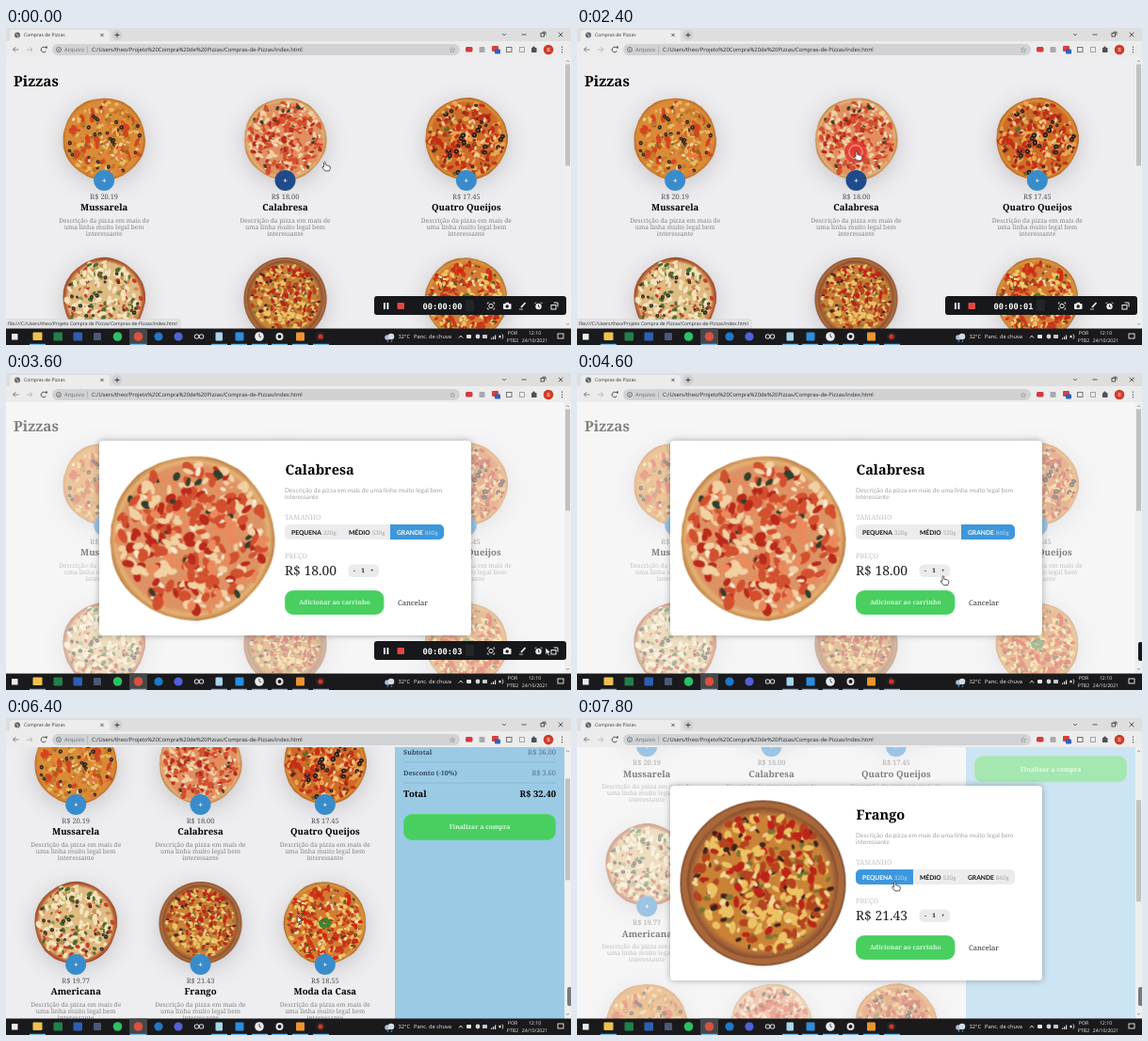
These frames come from a looping animation (600 px wide and 337 px high, 8000 ms). An HTML page with a canvas:

```html
<!DOCTYPE html>
<html lang="pt-BR">
<head>
<meta charset="utf-8">
<title>Compras de Pizzas</title>
<style>
html, body { margin: 0; width: 100%; height: 100%; overflow: hidden; background: #eeedef; }
canvas { display: block; width: 100vw; height: 100vh; }
</style>
</head>
<body>
<canvas id="stage"></canvas>
<script>
const W = 600, H = 337, LOOP = 8000, STEP = 200, TAU = Math.PI * 2;
const SLAB = '"Noto Serif", serif', UI = '"Open Sans", sans-serif', LATO = 'Lato, sans-serif';
const MONO = '"DejaVu Sans Mono", monospace';
const canvas = document.getElementById('stage');
let ctx = canvas.getContext('2d');

const ITEMS = [
  ['Mussarela', '20.19'], ['Calabresa', '18.00'], ['Quatro Queijos', '17.45'],
  ['Americana', '19.77'], ['Frango', '21.43'], ['Moda da Casa', '18.55']
];
const DESC = ['Descrição da pizza em mais de', 'uma linha muito legal bem', 'interessante'];

// Timelines: [ms, values...]
const CURSOR = [[0, 337.5, 142], [600, 329, 141], [1000, 330, 142], [1400, 337.5, 142], [2200, 296, 131],
  [3000, 296, 131], [3600, 573, 292], [3800, 580, 294], [4000, 580, 294], [4600, 388, 215.5], [5000, 387, 211],
  [5400, 376, 248], [5800, 376, 248], [6200, 350, 236], [6800, 228, 159], [7200, 228, 159], [7800, 336.5, 174]];
const POINTER = [[0, 'hand'], [2600, 'arrow'], [4400, 'hand'], [6000, 'arrow'], [6800, 'hand'], [7200, 'arrow'], [7600, 'hand']];
const RIPPLE = [[0, 0], [2400, 12], [2600, 8], [2800, 4], [3000, 0], [3800, 7], [4000, 0],
  [5000, 7], [5200, 0], [5600, 10], [5800, 7], [6000, 0]];
const MODAL = [[0, 0], [2600, .65], [2800, 1], [5600, .4], [5800, 0], [7200, 1]];
const ASIDE = [[0, 0], [5600, 85], [5800, 167], [6000, 180]];
const SCROLL = [[0, 0], [6200, 20], [6400, 70], [6600, 115], [6800, 131.7]];
const HOVER = [[0, 1], [2800, -1], [6800, 4], [7200, -1]];
const STATUS = [[0, 1], [3000, 0], [6800, 1], [7400, 0]];
const SECONDS = [[0, 0], [1600, 1], [2600, 2], [3600, 3]];

const at = (rows, t) => rows.filter(r => r[0] <= t).pop()[1];
function glide(rows, t) {
  const i = rows.findIndex(r => r[0] > t);
  if (i < 0) return rows[rows.length - 1].slice(1);
  const [a, b] = [rows[i - 1], rows[i]], k = (t - a[0]) / (b[0] - a[0]);
  return [1, 2].map(n => a[n] + (b[n] - a[n]) * k);
}

function box(x, y, w, h, color, r = 0) {
  ctx.fillStyle = color;
  ctx.beginPath();
  ctx.roundRect(x, y, w, h, r);
  ctx.fill();
}
function frame(x, y, w, h, color, width = .9) {
  ctx.strokeStyle = color;
  ctx.lineWidth = width;
  ctx.strokeRect(x, y, w, h);
}
function dot(x, y, r, color) {
  ctx.fillStyle = color;
  ctx.beginPath();
  ctx.arc(x, y, r, 0, TAU);
  ctx.fill();
}
function ring(x, y, r, color, w = 1, from = 0, to = TAU) {
  ctx.strokeStyle = color;
  ctx.lineWidth = w;
  ctx.beginPath();
  ctx.arc(x, y, r, from, to);
  ctx.stroke();
}
function line(color, w, ...p) {
  ctx.strokeStyle = color;
  ctx.lineWidth = w;
  ctx.beginPath();
  for (let i = 0; i < p.length; i += 2) ctx.lineTo(p[i], p[i + 1]);
  ctx.stroke();
}
// y is the middle of the capitals
function text(s, x, y, size, color, font = SLAB, weight = 400, align = 'left') {
  ctx.font = `${weight} ${size}px ${font}`;
  ctx.fillStyle = color;
  ctx.textAlign = align;
  ctx.fillText(s, x, y + size * .355);
}
function shadow(color, blur, dy, draw) {
  const k = canvas.width / W;
  ctx.save();
  ctx.shadowColor = color;
  ctx.shadowBlur = blur * k;
  ctx.shadowOffsetY = dy * k;
  draw();
  ctx.restore();
}

function seeded(s) {
  return () => {
    s = s + 0x6D2B79F5 | 0;
    let n = Math.imul(s ^ s >>> 15, 1 | s);
    n = n + Math.imul(n ^ n >>> 7, 61 | n) ^ n;
    return ((n ^ n >>> 14) >>> 0) / 4294967296;
  };
}

// toppings: [color, count, size, hollow?]
const RECIPES = [
  { rim: '#b5611f', crust: '#d88a35', cheese: '#d98c35', tops: [['#c4762a', 70, 6], ['#eab965', 70, 5],
    ['#d3451f', 28, 9], ['#e8773c', 28, 6], ['#77702c', 30, 3.5], ['#f3ddb0', 20, 4], ['#2a211d', 30, 4, 1]] },
  { rim: '#b8743a', crust: '#e3b274', cheese: '#dd9263', tops: [['#d2502f', 95, 7], ['#f1d0a2', 95, 6],
    ['#b92a1b', 50, 6], ['#ea8a5c', 60, 6], ['#30402a', 18, 5], ['#f7e9d0', 30, 4]] },
  { rim: '#a8551b', crust: '#dc8f35', cheese: '#cf6a28', tops: [['#e9a650', 70, 6], ['#c32e16', 75, 7],
    ['#efcc94', 50, 5], ['#8f2c17', 40, 5], ['#626a28', 22, 4], ['#201818', 28, 5, 1]] },
  { rim: '#8f4023', crust: '#c06a3a', cheese: '#dfbb82', tops: [['#f3e4bd', 100, 7], ['#d08d55', 60, 5],
    ['#c23f28', 42, 5], ['#4d6b30', 34, 6], ['#86a04c', 22, 4], ['#2b2525', 22, 4, 1]] },
  { rim: '#7d4525', crust: '#a9683a', cheese: '#c98236', board: 1, tops: [['#ebc263', 100, 6], ['#b3431f', 85, 6],
    ['#f0d898', 60, 4], ['#bd2417', 50, 6], ['#7c7430', 40, 4], ['#40231a', 45, 4]] },
  { rim: '#a5602a', crust: '#d9973f', cheese: '#d37b33', tops: [['#c83a1d', 85, 6], ['#efc766', 85, 6],
    ['#d5260f', 50, 6], ['#f3e0ae', 50, 4], ['#5a5527', 36, 4], ['#82301a', 36, 4]] }
];

function bake({ rim, crust, cheese, board, tops }, kind) {
  const rand = seeded(kind * 97 + 11), c = document.createElement('canvas'), main = ctx;
  c.width = c.height = 180;
  ctx = c.getContext('2d');
  ctx.translate(90, 90);
  if (board) {
    dot(0, 0, 88, rim);
    dot(0, 0, 86.5, crust);
    ctx.scale(.92, .92);
  }
  const fill = ctx.createRadialGradient(0, 0, 0, 0, 0, 89);
  fill.addColorStop(.86, cheese);
  fill.addColorStop(.92, crust);
  fill.addColorStop(1, rim);
  ctx.fillStyle = fill;
  ctx.beginPath();
  for (let a = 0; a < TAU; a += .1) {
    const r = 87 + .8 * Math.sin(5 * a + kind) + rand() * .8;
    ctx.lineTo(r * Math.cos(a), r * Math.sin(a));
  }
  ctx.fill();
  const pieces = tops.flatMap(([color, count, size, hollow]) =>
    Array.from({ length: count }, () => ({ color, size, hollow, order: rand() + (hollow ? .4 : 0) })));
  pieces.sort((a, b) => a.order - b.order);
  for (const { color, size, hollow } of pieces) {
    const a = rand() * TAU, r = 79 * Math.sqrt(rand()), long = size * (.7 + rand() * .5);
    const x = r * Math.cos(a), y = r * Math.sin(a), short = long * (hollow ? .9 : .4 + rand() * .4);
    ctx.fillStyle = color;
    ctx.beginPath();
    ctx.ellipse(x, y, long, short, rand() * TAU, 0, TAU);
    ctx.fill();
    if (hollow) dot(x, y, short * .35, '#a57a4c');
  }
  if (kind === 5) for (let i = 0; i < 7; i++) dot(9 * Math.cos(i * 2.4), 7 * Math.sin(i * 2.4), 5, '#3d8230');
  ctx = main;
  return c;
}
const pizzas = RECIPES.map(bake);
const pizza = (kind, x, y, r) => ctx.drawImage(pizzas[kind], x - r, y - r, r * 2, r * 2);

function greenButton(label, x, y, w, h) {
  box(x, y, w, h, '#58d66d', 9);
  box(x + 1, y + 1, w - 2, h - 2, '#48cf60', 8);
  text(label, x + w / 2, y + h / 2, 6.75, '#d5f6da', SLAB, 600, 'center');
}
function quantity(n, x, y, w) {
  box(x, y, w, 13.5, '#ebebed', 5);
  [['-', .2], [n, .48], ['+', .78]].forEach(([s, k]) =>
    text(s, x + w * k, y + 6.5, 6.3, '#111', SLAB, 700, 'center'));
}

function drawList(t, width, scroll) {
  text('Pizzas', 8, 57 - scroll, 15.3, '#000', SLAB, 700);
  for (let i = 0; i < 9; i++) {
    const [name, price] = ITEMS[i % 6], col = (width - 16) / 3;
    const x = 8 + col * (i % 3 + .5), y = 74 + 170 * Math.floor(i / 3) - scroll;
    if (y > 320) continue;
    shadow('#bfbec3', 26, 5, () => dot(x, y + 44, 42, '#d8a566'));
    pizza(i % 6, x, y + 44, 45);
    dot(x, y + 88, 11, at(HOVER, t) === i ? '#204b8b' : '#398ccb');
    text('+', x, y + 88, 8, '#fff', UI, 600, 'center');
    text('R$ ' + price, x, y + 105.5, 7.5, '#555', SLAB, 400, 'center');
    text(name, x, y + 117, 9.6, '#000', SLAB, 700, 'center');
    DESC.forEach((s, n) => text(s, x, y + 130.7 + n * 7, 6.62, '#858587', SLAB, 400, 'center'));
  }
}

function drawAside(left, scroll) {
  const x = left + 9, right = 584;
  ctx.save();
  ctx.beginPath();
  ctx.rect(left, 31, 593 - left, 289);
  ctx.clip();
  box(left, 31, 593 - left, 289, '#9bcae5');
  ctx.translate(0, -scroll);
  text('Suas Pizzas', x, 54.5, 11, '#000', SLAB, 700);
  pizza(1, x + 9, 77, 9);
  text('Calabresa (G)', x + 26, 77.5, 7.5, '#2b3740');
  quantity(2, right - 33, 70, 33);
  [95, 117, 139].forEach(y => line('#86b1ca', .8, x, y, right, y));
  [['Subtotal', '36.00', 106], ['Desconto (-10%)', '3.60', 128]].forEach(([s, v, y]) => {
    text(s, x, y, 7.1, '#34495a', SLAB, 600);
    text('R$ ' + v, right, y, 7.5, '#5b7485', SLAB, 400, 'right');
  });
  text('Total', x, 151, 9.5, '#000', SLAB, 700);
  text('R$ 32.40', right, 151, 9.5, '#000', SLAB, 700, 'right');
  greenButton('Finalizar a compra', x, 172, right - x, 28);
  ctx.restore();
}

function drawModal(t, alpha) {
  const kind = t < 7000 ? 1 : 4, [name, price] = ITEMS[kind];
  const photo = kind === 1 ? t >= 3000 : t >= 7400, chosen = t >= 7800 ? 0 : 2;
  ctx.globalAlpha = alpha;
  box(0, 31, 593, 289, 'rgba(255,255,255,.5)');
  shadow('rgba(0,0,0,.32)', 7, 0, () => box(99, 72, 395, 207, '#fff', 4));
  if (photo) pizza(kind, 197.5, 175.5, 90);
  text(name, 296.5, 102.5, 14.5, '#000', SLAB, 700);
  text(DESC.slice(0, 2).join(' '), 296, 124.5, 6.7, '#a3a3a3', LATO);
  text(DESC[2], 296, 132, 6.7, '#a3a3a3', LATO);
  text('TAMANHO', 296, 153, 7.4, '#c2c2c2');
  box(296, 161, 169, 16, '#ececee', 5);
  const edges = [296, 357, 408, 465];
  box(edges[chosen], 161, edges[chosen + 1] - edges[chosen], 16, '#3d97dc', chosen ? [0, 5, 5, 0] : [5, 0, 0, 5]);
  [['PEQUENA', '320g'], ['MÉDIO', '530g'], ['GRANDE', '860g']].forEach(([s, g], i) => {
    const x = edges[i] + 7;
    text(s, x, 169.3, 6.7, i === chosen ? '#fff' : '#111', LATO, 700);
    text(g, x + ctx.measureText(s).width + 1.8, 169.3, 6.2, i === chosen ? '#b9dcf5' : '#a5a5a5', LATO);
  });
  text('PREÇO', 296, 194, 7.4, '#c2c2c2');
  text('R$ ' + price, 296, 210.5, 13.9, '#222', SLAB, 300);
  quantity(t >= 5000 && kind === 1 ? 2 : 1, 363.5, 203.5, 32.5);
  greenButton('Adicionar ao carrinho', 296, 231, 105.5, 26);
  text('Cancelar', 416, 244, 7.6, '#333');
  ctx.globalAlpha = 1;
}

function drawBrowser() {
  const cross = (x, y, r) => {
    line('#333', .8, x - r, y - r, x + r, y + r);
    line('#333', .8, x - r, y + r, x + r, y - r);
  };
  box(0, 0, W, 15, '#dededf');
  box(4, 2, 106, 14, '#ececed', [4, 4, 0, 0]);
  dot(12, 7.5, 3, '#5f6368');
  line('#dee1e6', .7, 10, 6, 13, 8, 12, 10);
  text('Compras de Pizzas', 19, 7.5, 5, '#333', UI);
  cross(102, 7.5, 1.6);
  dot(118, 7.5, 5.5, '#cfd0d2');
  line('#333', .9, 115.5, 7.5, 120.5, 7.5);
  line('#333', .9, 118, 5, 118, 10);
  line('#555', .9, 527, 6, 529, 8, 531, 6);
  line('#333', .8, 547.5, 7, 552.5, 7);
  frame(568, 5.5, 3.5, 3.5, '#333', .8);
  line('#333', .8, 569.5, 4.2, 573, 4.2, 573, 7.5);
  cross(589, 7, 2.3);
  box(0, 14, W, 17, '#ececed');
  line('#85888c', 1, 13.5, 23, 7.5, 23, 10, 20.5, 7.5, 23, 10, 25.5);
  line('#b5b8bc', 1, 22, 23, 28, 23, 25.5, 20.5, 28, 23, 25.5, 25.5);
  ring(40, 23, 2.8, '#4a4d51', 1, .5, 5.6);
  box(42, 19.6, 1.8, 2, '#4a4d51');
  box(49, 17, 433, 12, '#d0d2d4', 6);
  ring(56, 23, 2.5, '#5f6368', .8);
  line('#5f6368', .8, 56, 22.3, 56, 24.5);
  text('Arquivo', 62, 23, 5.85, '#66696d', UI);
  line('#a0a3a7', .6, 86.5, 19.5, 86.5, 26.5);
  text('C:/Users/theo/Projeto%20Compra%20de%20Pizzas/Compras-de-Pizzas/index.html', 91, 23, 5.85, '#26282b', UI);
  text('☆', 474, 23, 8, '#4c5054', '"DejaVu Sans", sans-serif', 400, 'center');
  box(488, 20, 7.5, 5.5, '#d23b3f', 1.5);
  box(502.5, 20, 6, 6, '#a6a9ad', 1);
  box(516, 19, 7, 6, '#d6403b', 1);
  box(519, 22.5, 6, 5, '#2f5fc0', 1);
  frame(531.5, 20.5, 5.5, 5, '#66696d');
  frame(545.5, 20.5, 5, 5, '#9a9da1');
  box(558, 21, 5.5, 5, '#4d5156', .6);
  dot(560.5, 20.7, 1.3, '#4d5156');
  dot(576, 23, 5.3, '#cf3c27');
  text('B', 576, 23, 5.5, '#fff', UI, 400, 'center');
  [20.3, 23, 25.7].forEach(y => dot(590.5, y, .7, '#4a4d51'));
}

function drawScrollbar(scroll) {
  box(593, 31, 7, 289, '#efeff0');
  box(594, 38.5 + scroll * .37, 5, 108, '#c1c1c1');
  line('#777', .8, 595, 36, 596.5, 34.5, 598, 36);
  line('#777', .8, 595, 314, 596.5, 315.5, 598, 314);
}

function drawTaskbar() {
  const y = 328;
  box(0, 319.5, W, 18, '#1a1a1c');
  box(131, 319.5, 19, 18, '#45474a');
  box(6, 325, 6.5, 6.5, '#e8edf2');
  box(28.5, 323.5, 10, 8.5, '#f0c14e', 1);
  box(50.5, 323.5, 9.5, 9, '#21804c', 1);
  box(71.5, 323.5, 9.5, 9, '#2b5fb4', 1);
  box(93, 324, 8, 8, '#4b5878', 1);
  dot(118.5, y, 4.8, '#2bc163');
  dot(140.5, y, 4.8, '#d9513f');
  dot(162, y, 4.6, '#1f78c8');
  dot(183, y, 4.6, '#5261d8');
  [202.5, 207.5].forEach(x => ring(x, y, 2.2, '#c6cad0', 1.1));
  box(222.5, 323.5, 7.5, 9, '#a8d6ed', 1);
  box(243.5, 323.5, 9, 9, '#2b8ede', 1);
  dot(269, y, 4.8, '#e9ebee');
  line('#444', .9, 269, 325, 269, y, 271, 329);
  ring(290.5, y, 3, '#e4e6ea', 2);
  box(308, 323.5, 9, 9, '#ee9430', 1);
  dot(334, y, 4.8, '#2b2426');
  dot(334, y, 2.6, '#d8322b');
  [33, 140, 226, 247, 269, 290, 312, 334].forEach(x => box(x - 8, 335.8, 17, 1.2, '#76b9ed'));
  dot(405, 329, 2.8, '#aebccb');
  dot(409, 328, 3.3, '#d4dde6');
  line('#4aa0e8', .9, 406, 332, 405, 334);
  line('#4aa0e8', .9, 410, 332, 409, 334);
  text('32°C', 416.5, y, 5.75, '#f0f0f0', UI);
  text('Panc. de chuva', 433, y, 5.75, '#f0f0f0', UI);
  line('#eee', .9, 481, 329.5, 483, 327, 485, 329.5);
  box(489, 326, 5, 4, '#e7e7e7', 1);
  dot(501, y, 2.4, '#d5d8dc');
  box(506, 326, 5, 4, '#c4c9ce', .5);
  [0, 1, 2].forEach(i => box(515 + i * 2, 329.5 - i * 1.5, 1.2, 1.5 + i * 1.5, '#ddd'));
  box(523.5, 326.8, 2, 2.5, '#eee');
  line('#eee', .8, 527, 325.5, 528, 328, 527, 330.5);
  text('POR', 538, 324.3, 5.2, '#f0f0f0', UI, 400, 'center');
  text('PTB2', 538, 332, 5.2, '#f0f0f0', UI, 400, 'center');
  text('12:10', 561.5, 324.3, 5.2, '#f0f0f0', UI, 400, 'center');
  text('24/10/2021', 561.5, 332, 5.2, '#f0f0f0', UI, 400, 'center');
  frame(586, 325, 6, 5, '#eee');
}

function drawRecorder(t) {
  if (t >= 4000) {
    box(596, 286, 5, 20, t < 5000 ? '#15171a' : '#77797c', 2);
    return;
  }
  box(391, 285, 204, 20, '#17181b', 3);
  box(401, 292, 1.8, 7, '#fff');
  box(404.5, 292, 1.8, 7, '#fff');
  box(415.5, 292, 7.5, 7, '#e2473f', 1);
  text('00:00:0' + at(SECONDS, t), 463.5, 295.7, 8.7, '#fff', MONO, 700, 'center');
  box(488, 289, 9, 12, '#242529', 1);
  ring(515, 295.5, 2.2, '#eee', 1);
  [[-1, -1], [1, -1], [-1, 1], [1, 1]].forEach(([a, b]) =>
    line('#eee', .8, 515 + a * 2, 295.5 + b * 3.5, 515 + a * 3.7, 295.5 + b * 3.5, 515 + a * 3.7, 295.5 + b * 2));
  box(528, 293, 8.5, 6, '#eee', 1);
  box(530.5, 291.8, 3.5, 2, '#eee');
  dot(532.2, 296, 1.7, '#15171b');
  line('#eee', 1.8, 551.5, 292, 547, 297);
  line('#eee', .8, 545, 299, 549, 299);
  dot(565.5, 296, 3.2, '#eee');
  line('#15171b', .8, 565.5, 294, 565.5, 296.4, 567, 296.4);
  line('#eee', 1, 561.5, 293, 563, 291.5);
  line('#eee', 1, 569.5, 293, 568, 291.5);
  frame(579, 294.5, 5, 4.5, '#eee', 1);
  line('#eee', 1, 581.5, 292, 586, 292, 586, 296.5);
}

const SHAPES = {
  hand: new Path2D('M0 1Q1-.6 2 1V4L6 5Q8 5.2 7.6 8L6.5 11H1.5L-2 7Q-2.3 5.5 0 6.5Z'),
  arrow: new Path2D('M0 0V8.2L2 6.4L3.4 9.4L4.8 8.8L3.5 5.9H6Z')
};
function drawCursor(t) {
  const [x, y] = glide(CURSOR, t), r = at(RIPPLE, t);
  if (r) {
    dot(x, y + .8, r, 'rgba(226,56,48,.88)');
    ring(x, y + .8, r * .6, 'rgba(255,205,195,.8)', 1);
  }
  ctx.save();
  ctx.translate(x, y);
  ctx.scale(.9, .9);
  const shape = SHAPES[at(POINTER, t)];
  ctx.fillStyle = '#fff';
  ctx.strokeStyle = '#333';
  ctx.lineWidth = .9;
  ctx.fill(shape);
  ctx.stroke(shape);
  ctx.restore();
}

function draw(t) {
  const scroll = at(SCROLL, t), aside = at(ASIDE, t), alpha = at(MODAL, t);
  ctx.save();
  ctx.beginPath();
  ctx.rect(0, 31, 593, 289);
  ctx.clip();
  box(0, 31, 593, 289, '#eeedef');
  drawList(t, 593 - aside, scroll);
  if (aside) drawAside(593 - aside, scroll);
  if (alpha) drawModal(t, alpha);
  ctx.restore();
  drawBrowser();
  drawScrollbar(scroll);
  if (at(STATUS, t)) {
    box(-1, 309.5, 186.5, 11, '#cfd0d2', [0, 3, 0, 0]);
    box(-1, 310, 186, 10, '#e2e2e4', [0, 3, 0, 0]);
    text('file:///C:/Users/theo/Projeto Compra de Pizzas/Compras-de-Pizzas/index.html', 2, 314.7, 5, '#26282b', UI);
  }
  drawTaskbar();
  drawRecorder(t);
  drawCursor(t);
}

let shown = '';
const start = performance.now();
function tick() {
  const t = Math.floor((performance.now() - start) % LOOP / STEP) * STEP;
  const dpr = window.devicePixelRatio || 1;
  const w = Math.round(innerWidth * dpr), h = Math.round(innerHeight * dpr), key = [t, w, h].join();
  if (key !== shown) {
    shown = key;
    canvas.width = w;
    canvas.height = h;
    ctx.scale(w / W, h / H);
    ctx.textRendering = 'geometricPrecision';
    ctx.imageSmoothingQuality = 'high';
    draw(t);
  }
  requestAnimationFrame(tick);
}
tick();
</script>
</body>
</html>
```
